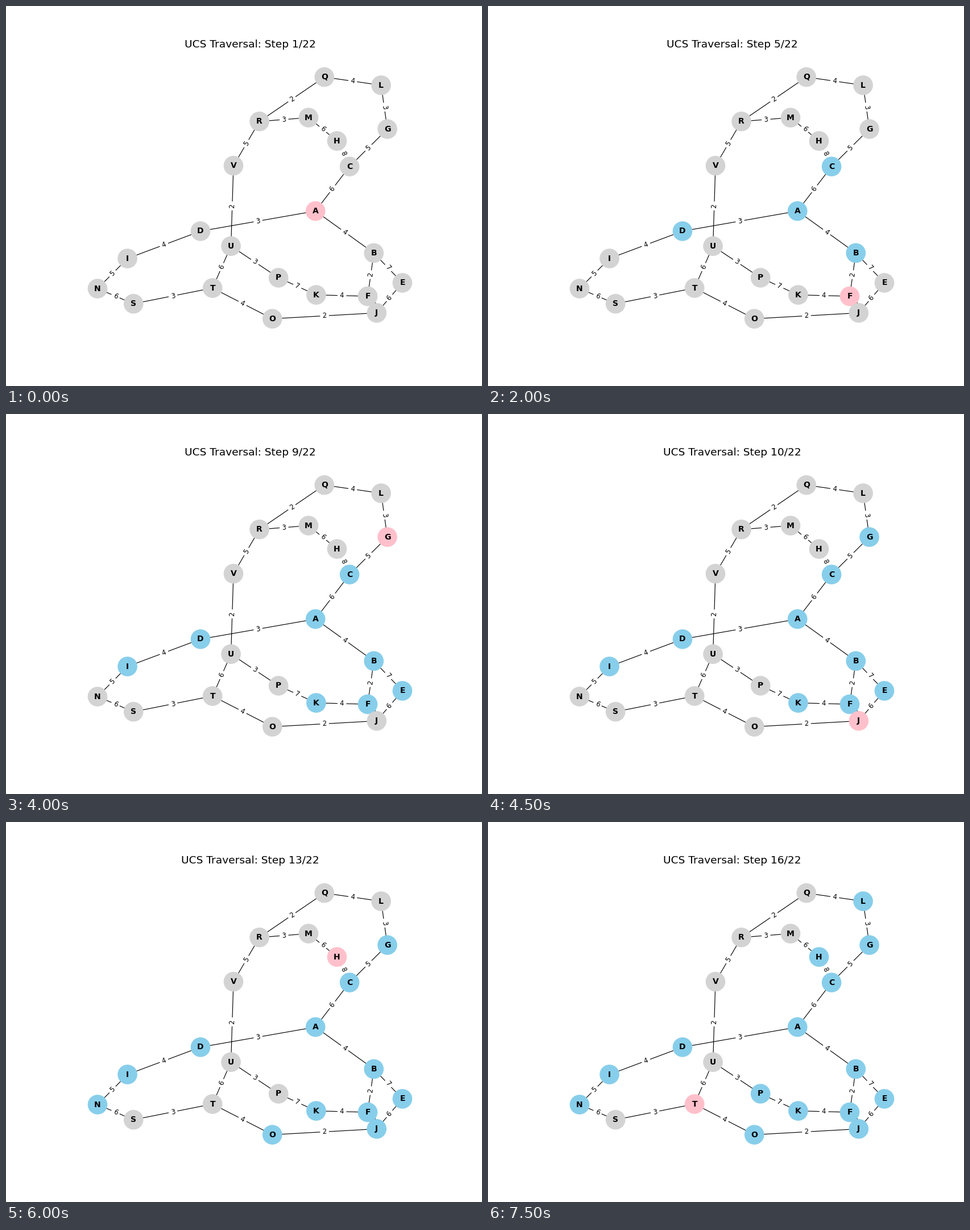
Animation, 837 px wide and 669 px high, one loop 8000 ms. Source, as a matplotlib script:

```python
import numpy as np
import matplotlib.pyplot as plt
from matplotlib.animation import FuncAnimation
from matplotlib.collections import LineCollection

W, H, DPI = 837, 669, 83.7
FRAMES, STEP_MS, TOTAL = 16, 500, 22

# Node centres in pixels, y pointing down
POS = {
    "A": (544.2, 361.0), "B": (646.8, 434.9), "C": (604.1, 282.6),
    "D": (342.0, 396.4), "E": (697.0, 487.4), "F": (636.0, 511.0),
    "G": (670.6, 216.6), "H": (582.0, 237.6), "I": (213.6, 444.5),
    "J": (651.8, 540.3), "K": (545.4, 508.6), "L": (659.6, 139.5),
    "M": (532.0, 196.5), "N": (161.0, 497.5), "O": (468.3, 550.6),
    "P": (479.2, 478.4), "Q": (559.8, 125.1), "R": (445.6, 203.2),
    "S": (224.2, 524.2), "T": (363.2, 496.5), "U": (395.6, 422.7),
    "V": (400.0, 281.1),
}
EDGES = ("AB4 AC6 AD3 BE7 BF2 CG5 CH8 DI4 EJ6 FJ5 FK4 GL3 HM6 IN5 "
         "JO2 KP7 LQ4 MR3 NS6 OT4 PU3 QR2 RV5 ST3 TU6 UV2").split()
VISITS = "ADBCFIKEGJNOHLPT"


def upright_angle(p, q):
    """Angle of the line p-q in degrees, kept readable."""
    angle = np.degrees(np.arctan2(p[1] - q[1], q[0] - p[0]))
    if angle > 90:
        angle -= 180
    if angle < -90:
        angle += 180
    return angle


def node_colors(step):
    seen = VISITS[:step]
    return ["pink" if n == VISITS[step] else
            "skyblue" if n in seen else "lightgray" for n in POS]


plt.rcParams["font.family"] = "DejaVu Sans"
fig, ax = plt.subplots(figsize=((W + 1e-6) / DPI, (H + 1e-6) / DPI), dpi=DPI)
fig.subplots_adjust(left=0.125, right=0.9, bottom=0.11, top=0.88)
ax.axis("off")

ax.add_collection(LineCollection([(POS[u], POS[v]) for u, v, _ in EDGES],
                                 colors="black", linewidths=1, zorder=1))
for u, v, cost in EDGES:
    p, q = POS[u], POS[v]
    ax.text((p[0] + q[0]) / 2, (p[1] + q[1]) / 2, cost, size=10,
            ha="center", va="center", rotation=upright_angle(p, q), zorder=1,
            bbox=dict(boxstyle="round", ec="white", fc="white"))

nodes = ax.scatter(*zip(*POS.values()), s=800, c=node_colors(0),
                   linewidths=1.5, zorder=2)
for name, (x, y) in POS.items():
    ax.text(x, y, name, size=12, weight="bold", ha="center", va="center")

# Data units equal figure pixels
ax.set_xlim(0.125 * W, 0.9 * W)
ax.set_ylim(0.89 * H, 0.12 * H)
title = ax.set_title("", fontsize=16)


def update(step):
    colors = node_colors(step)
    nodes.set_facecolor(colors)
    nodes.set_edgecolor(colors)
    title.set_text(f"UCS Traversal: Step {step + 1}/{TOTAL}")
    return nodes, title


anim = FuncAnimation(fig, update, frames=FRAMES, interval=STEP_MS, repeat=True)
plt.show()
```
